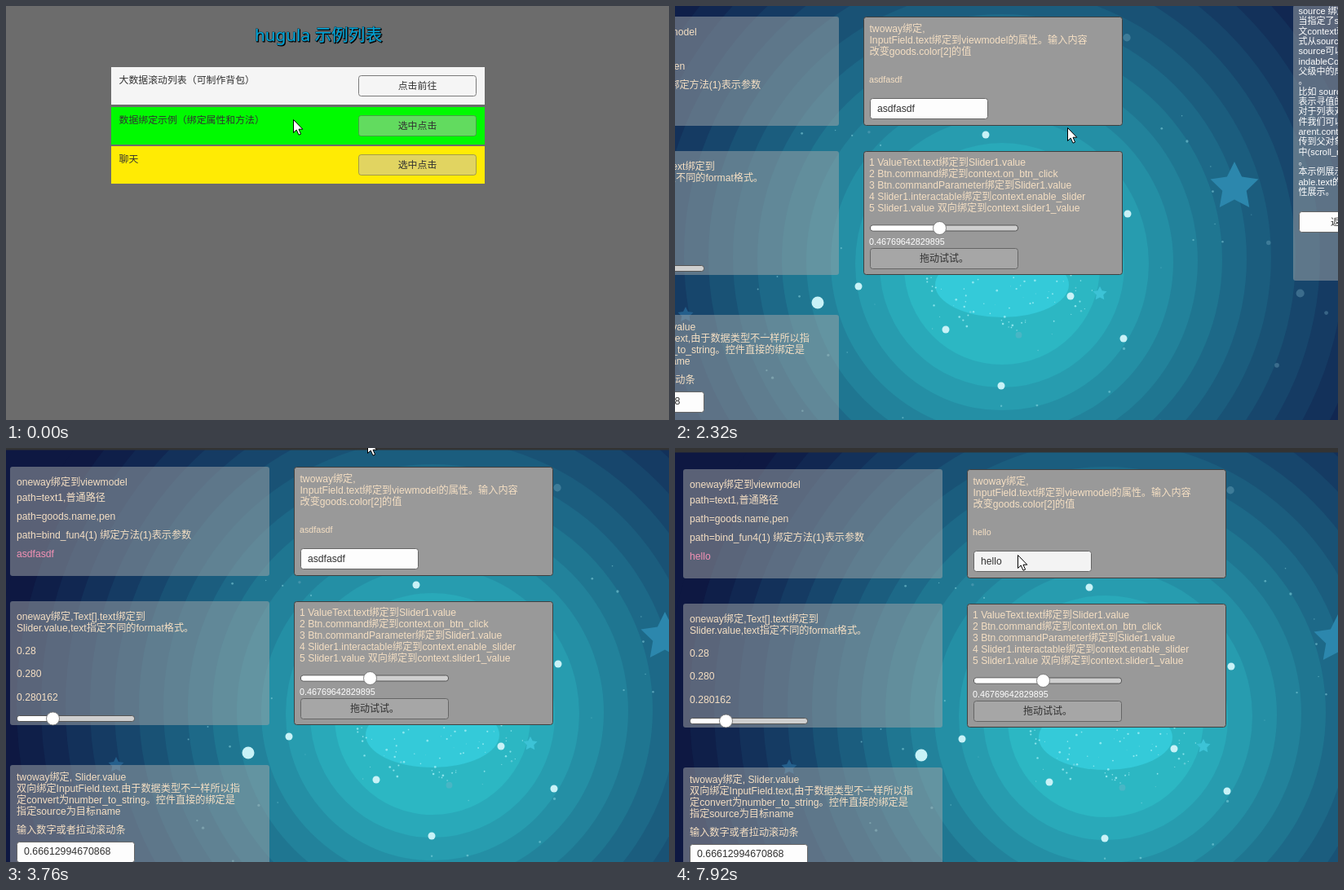
Recreate the animation shown at these times as an HTML page. Size 813x508 px, loop 8000 ms.

```html
<!DOCTYPE html>
<html lang="zh">
<head>
<meta charset="utf-8">
<style>
html, body { margin: 0; width: 100%; height: 100%; overflow: hidden; background: #6c6c6c; }
svg { display: block; width: 813px; height: 508px; }
text { white-space: pre; font-family: "Liberation Sans", "Noto Sans CJK SC", "Noto Sans CJK", sans-serif; }
#list text { font-family: "Noto Sans", "Noto Sans CJK SC", "Noto Sans CJK", sans-serif; }
</style>
</head>
<body>
<svg viewBox="0 0 813 508">
  <g id="list"></g>
  <g id="demo"></g>
  <path id="cursor" d="M.5 .5V16.5L4.2 13L7 19.2L9.6 18.1L7 12.2H11.8Z" fill="#fff" stroke="#000"/>
</svg>
<script>
const $ = id => document.getElementById(id);
const list = $('list'), demo = $('demo'), cursor = $('cursor');
const PEACH = '#f5dfc3', INK = '#323232';

function add(parent, tag, attrs, content) {
  const el = document.createElementNS('http://www.w3.org/2000/svg', tag);
  for (const k in attrs) el.setAttribute(k, attrs[k]);
  if (content !== undefined) el.textContent = content;
  parent.append(el);
  return el;
}
const rect = (p, x, y, width, height, fill, more) =>
  add(p, 'rect', { x, y, width, height, fill, ...more });
const box = (p, x, y, w, h, fill, stroke) =>
  rect(p, x + .5, y + .5, w - 1, h - 1, fill, { rx: 3, stroke });
const disc = (cx, cy, r, fill, more) => add(demo, 'circle', { cx, cy, r, fill, ...more });
const text = (p, x, y, s, fill = PEACH, size = 12.15, more) =>
  add(p, 'text', { x, y, fill, 'font-size': size, ...more }, s);

// ---- list screen ----
rect(list, 0, 0, 813, 508, '#6c6c6c');
const title = (x, y, fill, stroke) => text(list, x, y, 'hugula 示例列表', fill, 20.7,
  { stroke, 'paint-order': 'stroke' });
title(306, 44, '#000', '#000');
title(305, 43, '#00a5d8', '#1c3a46');

const rows = [
  ['大数据滚动列表（可制作背包）', '#00ffff'],
  ['数据绑定示例（绑定属性和方法）', '#00fa00'],
  ['聊天', '#ffeb04']
].map(([name, color], i) => {
  const y = Math.round(75 + 48.5 * i);
  const bg = rect(list, 129, y, 458, 46, color);
  text(list, 138.5, y + 20, name, INK, 11.9);
  const button = box(list, 432, y + 10, 145, 26);
  const label = text(list, 504.5, y + 27, '', INK, 11.9, { 'text-anchor': 'middle' });
  return { color, bg, button, label };
});

function paintRow({ color, bg, button, label }, white, active, pressed) {
  bg.setAttribute('fill', white ? '#f5f5f5' : color);
  button.setAttribute('fill', !active ? 'rgba(196,190,190,.5)' : pressed ? '#cacaca' : '#f5f5f5');
  button.setAttribute('stroke', active ? '#7a7a7a' : 'rgba(90,90,90,.5)');
  label.textContent = active ? '点击前往' : '选中点击';
}

// ---- demo screen: backdrop ----
rect(demo, -20, -20, 1100, 580, '#0e1842');
for (let r = 540; r > 90; r -= 30) {
  const u = 1 - r / 540, g = u ** 1.2;
  disc(528, 318 + 25 * u * u, r, `rgb(${14 + 40 * g},${24 + 215 * g},${66 + 170 * u ** 1.1})`);
}
add(demo, 'ellipse', { cx: 528, cy: 355, rx: 82, ry: 40, fill: '#34cad9' });

function star(x, y, r, fill) {
  const points = Array.from({ length: 10 }, (_, i) => {
    const a = i * Math.PI / 5, d = i % 2 ? r * .5 : r;
    return [x + d * Math.sin(a), y - d * Math.cos(a)];
  });
  add(demo, 'polygon', { points: points.join(' '), fill });
}
star(813, 235, 31, '#2c87ad');
star(140, 392, 10, '#245f8c');
star(648, 366, 9, '#3cc3d6');

// a few bright lights, then random sparkle around them
for (const [x, y] of [[508, 171], [682, 268], [302, 377], [352, 357], [459, 410], [527, 479], [612, 369], [677, 421]])
  disc(x, y, x < 303 ? 7.5 : 4.5, '#c8f2f7');

let seed = 7;
const rnd = () => (seed = seed * 16807 % 2147483647) / 2147483647;
function sparkle(count, rx, ry, size, fill, opacity) {
  while (count--) {
    const a = rnd() * 2 * Math.PI, d = Math.sqrt(rnd());
    disc(528 + rx * d * Math.cos(a), 362 + ry * d * Math.sin(a), size * (.4 + rnd()), fill, { opacity });
  }
}
sparkle(80, 115, 48, 1, '#a5f0f5', .75);
sparkle(60, 330, 300, 1.2, '#8fdbe6', .5);
sparkle(20, 400, 380, 4, '#7db4c8', .35);

// ---- demo screen: panels ----
const panel = (x, y, h, solid) => solid
  ? box(demo, x, y, 318, h, '#999', '#404040')
  : rect(demo, x, y, 318, h, 'rgba(160,165,168,.52)', { rx: 3 });
const lines = (x, y, step, rowsOfText, fill, size) =>
  rowsOfText.forEach((s, i) => text(demo, x, y + i * step, s, fill, size));
const field = (x, y) => box(demo, x, y, 145, 26, '#fdfdfd', '#666');
function slider(x, y, w, knob) {
  rect(demo, x + .5, y - 3.5, w - 1, 7, '#cfcfcf', { rx: 3, stroke: '#555' });
  rect(demo, x + 1, y - 3, knob - x, 6, '#fff', { rx: 3 });
  disc(knob, y, 8, '#fff', { stroke: '#666', 'stroke-width': .8 });
}

panel(10, 26, 134);
text(demo, 18, 49, 'oneway绑定到viewmodel');
lines(18, 68, 22.9, ['path=text1,普通路径', 'path=goods.name,pen', 'path=bind_fun4(1) 绑定方法(1)表示参数']);
const pink = text(demo, 18, 137, '', '#f291b4');

panel(358, 26, 134, true);
lines(365.5, 45, 14, ['twoway绑定,', 'InputField.text绑定到viewmodel的属性。输入内容', '改变goods.color[2]的值']);
const echo = text(demo, 365, 107, '', PEACH, 10.7);
const input = field(366, 126);
const marked = rect(demo, 375, 132, 46, 13, '#a8ceff');
const typed = text(demo, 375, 143, '', INK);
const caret = rect(demo, 0, 132, 1, 13, INK);

panel(10, 191, 152);
lines(18, 214, 14, ['oneway绑定,Text[].text绑定到', 'Slider.value,text指定不同的format格式。']);
lines(18, 256, 28.4, ['0.28', '0.280', '0.280162']);
slider(18, 335, 145, 62.5);

panel(358, 191, 152, true);
lines(365, 209, 14, ['1 ValueText.text绑定到Slider1.value', '2 Btn.command绑定到context.on_btn_click',
  '3 Btn.commandParameter绑定到Slider1.value', '4 Slider1.interactable绑定到context.enable_slider',
  '5 Slider1.value 双向绑定到context.slider1_value']);
slider(366, 285.5, 182, 451.5);
text(demo, 365, 306, '0.46769642829895', '#fff', 10.75);
box(demo, 366, 310, 182, 26, '#a6a6a6', '#666');
text(demo, 427, 327, '拖动试试。', INK, 12);

panel(10, 392, 140);
lines(18, 411, 13.9, ['twoway绑定, Slider.value', '双向绑定InputField.text,由于数据类型不一样所以指',
  '定convert为number_to_string。控件直接的绑定是', '指定source为目标name']);
text(demo, 18, 476, '输入数字或者拉动滚动条');
field(18, 486);
text(demo, 27, 502, '0.66612994670868', INK, 12.35);

panel(885, 12, 338);
lines(891.5, 23, 12.33, ['source 绑定目标', '当指定了source', '文context就会', '式从source开始', 'source可以是',
  'indableContainer', '父级中的成员', '。', '比如 source=', '表示寻值的时', '对于列表对象', '件我们可以用p',
  'arent.context', '传到父对象之', '中(scroll_rect)', '。', '本示例展示了', 'able.text的属', '性展示。'], '#fff', 11);
field(892, 265);
text(demo, 931, 282, '返回', INK, 11.9);
rect(demo, -20, -30, 1100, 35.5, '#333');

// ---- motion: moves advance in even steps of 120 ms ----
const STEP = 120;
const progress = (t, start, steps) =>
  Math.min(1, Math.max(0, Math.floor((t - start) / STEP) + 1) / steps);

// start time, steps, where the pointer ends up
const moves = [
  [840, 1, 351, 147], [1570, 4, 481, 149], [2600, 2, 463, 150], [2860, 4, 443, -10],
  [4060, 3, 426, 134], [4550, 1, 415, 124], [4830, 1, 426, 134], [5290, 1, 434, 127],
  [7230, 2, 431, 112], [7500, 1, 431, 93], [7770, 1, 425, 108], [7920, 1, 420, 131]
];
function pointer(t) {
  let x = 352, y = 139;
  for (const [start, steps, toX, toY] of moves) {
    const p = progress(t, start, steps);
    x += (toX - x) * p;
    y += (toY - y) * p;
  }
  return [x, y];
}
function pan(t) {
  const rest = 1 - progress(t, 3370, 5);
  return [Math.round(-127 * rest ** 2), Math.round(-13 * rest)];
}
const selected = t => t < 150 ? 0 : t >= 690 && t < 1300 ? 2 : 1;
const typing = t => t < 6130 ? 'asdfasdf' : 'hello'.slice(0, (t - 6130) / 135 + 1);

const show = (el, on) => el.setAttribute('visibility', on ? 'inherit' : 'hidden');
const move = (el, [x, y]) => el.setAttribute('transform', `translate(${x} ${y})`);

function draw(t) {
  const inDemo = t >= 2320;
  show(list, !inDemo);
  show(demo, inDemo);
  move(cursor, pointer(t));
  move(demo, pan(t));

  const sel = selected(t);
  rows.forEach((row, i) =>
    paintRow(row, i === sel || (i === 0 && t < 300), i === sel, t >= 2200));

  pink.textContent = echo.textContent = t < 7500 ? 'asdfasdf' : 'hello';
  typed.textContent = typing(t);
  show(marked, t >= 4830 && t < 6130);
  show(caret, t >= 6130 && t < 7350);
  caret.setAttribute('x', 375 + Math.round(typed.getComputedTextLength()));
  input.setAttribute('fill', t < 7920 ? '#fdfdfd' : '#f3f3f3');
}
const start = performance.now();
function tick() {
  draw((performance.now() - start) % 8000);
  requestAnimationFrame(tick);
}
tick();
</script>
</body>
</html>
```
